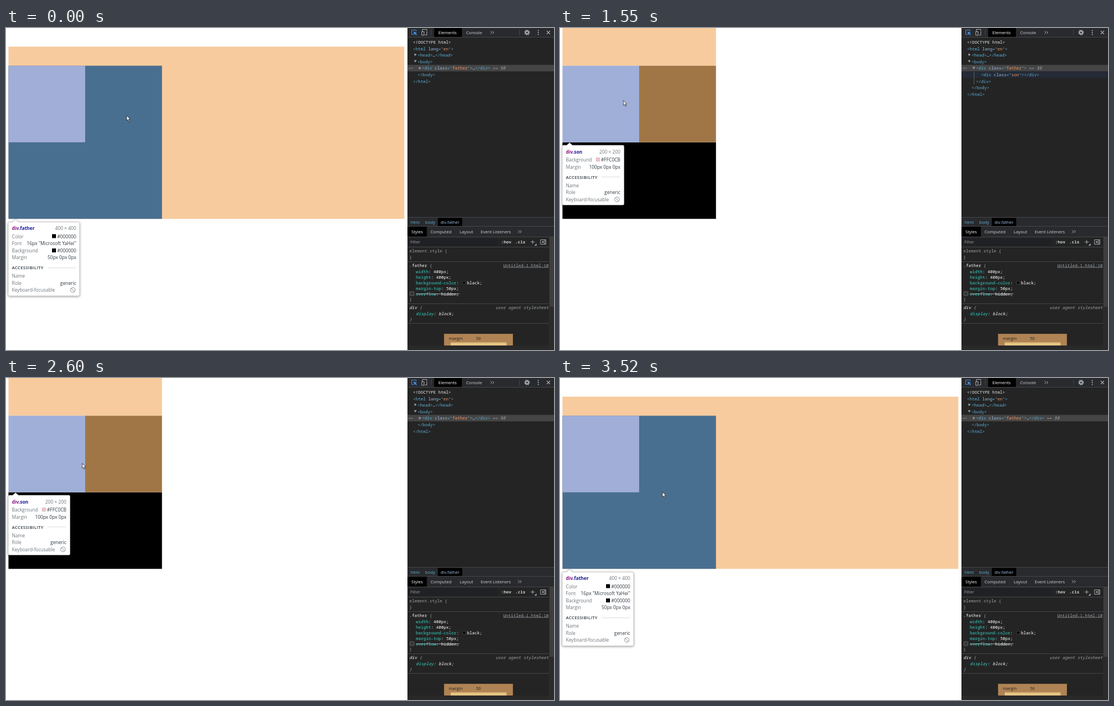
These frames come from a looping animation (976 by 574 pixels, 3.57 s). An HTML page:

```html
<!DOCTYPE html>
<html lang="en">
<head>
<meta charset="utf-8">
<title>Margin collapse in the inspector</title>
<style>
html, body { margin: 0; width: 100%; height: 100%; overflow: hidden; background: #fff; }
svg { display: block; width: 976px; height: 574px; }
text { font: 7.6px "Open Sans", "Noto Sans", sans-serif; white-space: pre; }
.mono text { font: 7.5px "Noto Sans Mono", "Liberation Mono", monospace; }
.mono .i { font-style: italic; }
.mono .b { font-weight: 700; }
.e { text-anchor: end; }
.panel { fill: #d0d3d7; }
.panel .on { fill: #fff; }
.tag { fill: #5db0d7; }
.attr { fill: #9bbbdc; }
.val { fill: #f29766; }
.dim { fill: #9aa0a6; }
.prop { fill: #35d4c7; }
.line { fill: none; stroke: #44464a; }
.icon { fill: none; stroke: #a5a9ae; }
.tip text { font-size: 8.3px; fill: #303942; }
.tip .k { fill: #6e757c; }
.tip .name { font-weight: 700; fill: #1a1a9c; }
.tip .cap { font-size: 7.6px; font-weight: 600; letter-spacing: .35px; }
.card { filter: drop-shadow(0 1px 2px #0006); fill: #fff; stroke: #bbb; stroke-width: .6; }

.father, .son, .open, .closed { animation: 3570ms step-end infinite; }
.father { animation-name: father; }
.son { animation-name: son; }
.open { animation-name: open; }
.closed { animation-name: closed; }
#cursor { animation: move 3570ms step-end infinite; }

@keyframes father {
  0%, 47.05%, 92.01% { visibility: visible; }
  25.76%, 71.84% { visibility: hidden; }
}
@keyframes son {
  0%, 47.05%, 92.01% { visibility: hidden; }
  25.76%, 71.84% { visibility: visible; }
}
@keyframes closed {
  0%, 47.05%, 92.01% { visibility: visible; }
  27.16%, 73.1% { visibility: hidden; }
}
@keyframes open {
  0%, 47.05%, 92.01% { visibility: hidden; }
  27.16%, 73.1% { visibility: visible; }
}
@keyframes move {
  0% { transform: translate(215px, 156px); }
  1.4% { transform: translate(212px, 158.5px); }
  20.16% { transform: translate(212px, 158.5px); animation-timing-function: steps(4); }
  25.76% { transform: translate(139px, 135.5px); animation-timing-function: steps(5); }
  32.77% { transform: translate(113px, 129px); }
  43.41% { transform: translate(113px, 129px); animation-timing-function: steps(3); }
  47.05% { transform: translate(153px, 155px); animation-timing-function: steps(6); }
  54.9% { transform: translate(200px, 162px); }
  62.74% { transform: translate(200px, 162px); animation-timing-function: steps(6); }
  70.58% { transform: translate(140px, 155px); animation-timing-function: steps(5); }
  77.03% { transform: translate(119px, 140px); }
  78.43% { transform: translate(117px, 139.5px); }
  79.27% { transform: translate(116px, 139px); }
  88.23% { transform: translate(116px, 139px); animation-timing-function: steps(2); }
  90.75% { transform: translate(142.5px, 164.5px); animation-timing-function: steps(6); }
  98.59%, 100% { transform: translate(182.5px, 203px); }
}
</style>
</head>
<body>
<svg viewBox="0 0 976 574">
  <defs>
    <g id="none" fill="none" stroke="#6e757c" stroke-width=".8">
      <circle r="4.2"/><path d="M-3-3 3 3"/>
    </g>
    <path id="chev" class="icon" d="M-3-2.5-.5 0-3 2.5M.5-2.5 3 0 .5 2.5"/>
  </defs>

  <!-- Page -->
  <rect width="715" height="574" fill="#fff"/>
  <g class="father">
    <path d="M4.400 33.200H709.400V340.200H4.400z" fill="#f7cb9d"/>
    <path d="M4.400 67.200H277.800V340.200H4.400z" fill="#496f90"/>
    <path d="M4.400 67.200H141V203.700H4.400z" fill="#a0aed8"/>
    <g class="tip">
      <path class="card" d="M6 346H12L17 341 22 346H129a2 2 0 0 1 2 2V475.5a2 2 0 0 1-2 2H6a2 2 0 0 1-2-2V348a2 2 0 0 1 2-2z"/>
      <text class="name" x="10.5" y="360"><tspan fill="#881280">div</tspan>.father</text>
      <text class="k e" x="125" y="360">400 × 400</text>
      <text class="k" x="10.5" y="374.5">Color</text>
      <path d="M82 367.5h7v7h-7z"/>
      <text class="e" x="125" y="374.5">#000000</text>
      <text class="k" x="10.5" y="387">Font</text>
      <text class="e" x="125" y="387">16px "Microsoft YaHei"</text>
      <text class="k" x="10.5" y="399.7">Background</text>
      <path d="M82 393h7v7h-7z"/>
      <text class="e" x="125" y="399.7">#000000</text>
      <text class="k" x="10.5" y="412.3">Margin</text>
      <text class="e" x="125" y="412.3">50px 0px 0px</text>
      <text class="cap" x="10.5" y="430">ACCESSIBILITY</text>
      <path d="M74 427.5H125" stroke="#ddd"/>
      <text class="k" x="10.5" y="445">Name</text>
      <text class="k" x="10.5" y="457.6">Role</text>
      <text class="e" x="125" y="457.6">generic</text>
      <text class="k" x="10.5" y="470.2">Keyboard-focusable</text>
      <use href="#none" x="119" y="467"/>
    </g>
  </g>
  <g class="son">
    <path d="M4.4 203.7H277.8V340.2H4.4z" fill="#000"/>
    <path d="M4.4 0H277.8V67.2H4.4z" fill="#f7cb9d"/>
    <path d="M141 67.2H277.8V203.7H141z" fill="#a17646"/>
    <path d="M4.4 67.2H141V203.7H4.4z" fill="#a0afd8"/>
    <g class="tip">
      <path class="card" d="M6 209H12L17 204.5 22 209H112a2 2 0 0 1 2 2V313.5a2 2 0 0 1-2 2H6a2 2 0 0 1-2-2V211a2 2 0 0 1 2-2z"/>
      <text class="name" x="10.5" y="223.5"><tspan fill="#881280">div</tspan>.son</text>
      <text class="k e" x="107.5" y="223.5">200 × 200</text>
      <text class="k" x="10.5" y="238.3">Background</text>
      <path d="M64.5 231.5h6v6h-6z" fill="#ffc0cb" stroke="#aaa" stroke-width=".6"/>
      <text class="e" x="107.5" y="238.3">#FFC0CB</text>
      <text class="k" x="10.5" y="250.8">Margin</text>
      <text class="e" x="107.5" y="250.8">100px 0px 0px</text>
      <text class="cap" x="10.5" y="268.5">ACCESSIBILITY</text>
      <path d="M74 265.5H107" stroke="#ddd"/>
      <text class="k" x="10.5" y="283.5">Name</text>
      <text class="k" x="10.5" y="296.1">Role</text>
      <text class="e" x="107.5" y="296.1">generic</text>
      <text class="k" x="10.5" y="308.7">Keyboard-focusable</text>
      <use href="#none" x="101.5" y="305.5"/>
    </g>
  </g>

  <!-- Inspector -->
  <g class="panel">
    <rect x="715" width="261" height="574" fill="#242424"/>
    <path d="M715 0H976V16.5H715zM715 338H976V372.5H715z" fill="#292a2d"/>
    <path d="M762.5 0H812V16.5H762.5zM769 338.5H812.5V353H769zM715 354H749.5V372.5H715z" fill="#000"/>
    <path class="line" d="M715 16.5H976M757.5 3V13M914.5 3V13M715 337.5H976M715 353.5H976M715 372.5H976M715 390.5H967M715 416.5H967M715 491.5H967M715 526.5H967"/>

    <path class="icon" d="M726 11.5H722.5V3.5H730.5V6" stroke="#4a8fe0" style="stroke: #4a8fe0"/>
    <path d="M725.5 6 732 8.5 729.5 9.5 732 12 731 13 728.5 10.5 727.5 13z" fill="#4a8fe0"/>
    <path class="icon" d="M741.5 6V2.5H749.5V5M740.5 6.5H744.5V13H740.5zM746 12.5H749.5V6"/>
    <text class="on" x="770" y="10.7">Elements</text>
    <text x="819.5" y="10.7">Console</text>
    <use href="#chev" x="866" y="8"/>
    <circle class="icon" cx="928" cy="8" r="2.7" stroke-width="2.2"/>
    <circle class="icon" cx="928" cy="8" r="4.3" stroke-width="1.5" stroke-dasharray="1.7 1.677"/>
    <g fill="#b4b8bd"><circle cx="948" cy="4.5" r="1"/><circle cx="948" cy="8" r="1"/><circle cx="948" cy="11.5" r="1"/></g>
    <path class="icon" d="M963 5 969 11M969 5 963 11" stroke-width="1.2"/>

    <!-- Element tree -->
    <rect x="715" y="65.7" width="261" height="11.6" fill="#454545"/>
    <g class="mono">
      <text x="725" y="28" fill="#e8eaed">&lt;!DOCTYPE html&gt;</text>
      <text class="tag" x="725" y="39.6">&lt;html <tspan class="attr">lang</tspan>="<tspan class="val">en</tspan>"&gt;</text>
      <path class="dim" d="M727.5 45 731.5 47.5 727.5 50zM726.5 57.5H731.5L729 61.5z"/>
      <text class="tag" x="733" y="51.2">&lt;head&gt;<tspan fill="#e8eaed">…</tspan>&lt;/head&gt;</text>
      <text class="tag" x="733" y="62.8">&lt;body&gt;</text>
      <g fill="#b4b8bd"><circle cx="718" cy="71.8" r=".7"/><circle cx="720.7" cy="71.8" r=".7"/><circle cx="723.4" cy="71.8" r=".7"/></g>
      <text class="tag" x="741" y="74.4">&lt;div <tspan class="attr">class</tspan>="<tspan class="val">father</tspan>"&gt;</text>
      <g class="closed">
        <path class="dim" d="M735.5 69 739.5 71.5 735.5 74z"/>
        <text class="tag" x="831" y="74.4"><tspan fill="#e8eaed">…</tspan>&lt;/div&gt;<tspan class="dim"> == </tspan><tspan class="dim i">$0</tspan></text>
        <text class="tag" x="733" y="86">&lt;/body&gt;</text>
        <text class="tag" x="725" y="97.6">&lt;/html&gt;</text>
      </g>
      <g class="open">
        <rect x="716" y="77.3" width="259" height="11.6" rx="2" fill="#242a36"/>
        <path class="dim" d="M734.5 69.5H739.5L737 73.5z"/>
        <path d="M737.5 78V100" stroke="#5b6167"/>
        <text class="dim" x="831" y="74.4"> == <tspan class="i">$0</tspan></text>
        <text class="tag" x="750" y="86">&lt;div <tspan class="attr">class</tspan>="<tspan class="val">son</tspan>"&gt;&lt;/div&gt;</text>
        <text class="tag" x="741" y="97.6">&lt;/div&gt;</text>
        <text class="tag" x="733" y="109.2">&lt;/body&gt;</text>
        <text class="tag" x="725" y="120.8">&lt;/html&gt;</text>
      </g>
    </g>

    <!-- Breadcrumbs and tabs -->
    <text class="tag" x="720.5" y="348.8">html</text>
    <text class="tag" x="746.5" y="348.8">body</text>
    <text x="774" y="348.8" fill="#a9c7ea">div.father</text>
    <text class="on" x="722" y="365.8">Styles</text>
    <text x="756" y="365.8">Computed</text>
    <text x="808" y="365.8">Layout</text>
    <text x="845.5" y="365.8">Event Listeners</text>
    <use href="#chev" x="915" y="363"/>

    <!-- Style rules -->
    <rect x="716" y="375" width="159" height="13" fill="#202124"/>
    <text class="dim" x="720" y="384.2">Filter</text>
    <path class="icon" d="M934.5 381.5H941.5M938 378V385M952 377.5H961.5V385.5H952zM959.5 377.5V385.5"/>
    <path d="M945 384V388H941zM957.5 379V384L954 381.5z" fill="#a5a9ae"/>
    <g class="mono">
      <text class="b" x="882" y="384">:hov</text>
      <text class="b" x="907" y="384">.cls</text>
      <text class="dim" x="718.5" y="400">element.style {</text>
      <text class="dim" x="718.5" y="411">}</text>
      <text class="on" x="718.5" y="425.5">.father <tspan class="dim">{</tspan></text>
      <text class="dim e" x="966.5" y="425.5" text-decoration="underline">Untitled-1.html:10</text>
      <text class="prop" x="730" y="437">width<tspan class="on">: 400px;</tspan></text>
      <text class="prop" x="730" y="447">height<tspan class="on">: 400px;</tspan></text>
      <text class="prop" x="730" y="456.8">background-color<tspan class="on">:</tspan></text>
      <path d="M813.5 451.5h5v5h-5z" fill="#000" stroke="#555" stroke-width=".6"/>
      <text class="on" x="821" y="456.8">black;</text>
      <text class="prop" x="730" y="466.7">margin-top<tspan class="on">: 50px;</tspan></text>
      <rect x="719.5" y="470" width="7" height="7" rx="1" fill="#333" stroke="#666"/>
      <text class="prop" x="730" y="476.5">overflow<tspan class="on">: hidden;</tspan></text>
      <path d="M730 474H807.5" stroke="#c9d5d5" stroke-width=".8"/>
      <text class="dim" x="718.5" y="486">}</text>
      <text class="on i" x="718.5" y="501">div <tspan class="dim">{</tspan></text>
      <text class="dim e i" x="966.5" y="501">user agent stylesheet</text>
      <text class="prop i" x="730" y="511.7">display<tspan class="on">: block;</tspan></text>
      <text class="dim i" x="718.5" y="521.5">}</text>
    </g>

    <!-- Box model -->
    <path d="M780 545H903V566H780z" fill="#b08354"/>
    <path d="M780.5 566V545.5H902.5V566" fill="none" stroke="#6d5439" stroke-dasharray="2 1.5" stroke-width=".7"/>
    <path d="M792 560.5H891.5V566H792z" fill="#e4c381"/>
    <text x="788.5" y="556.3" fill="#222">margin</text>
    <text x="837" y="556.3" fill="#222">50</text>
    <path d="M715 566H967V574H715z" fill="#292929"/>
    <path d="M967 373H976V574H967z" fill="#2b2b2b"/>
    <path d="M968 373H975.5V497H968z" fill="#3e3e3e"/>
  </g>

  <path id="cursor" d="M0 0V9L2 7.2 3.6 10.7 5 10 3.5 6.7H6z" fill="#fff" stroke="#111" stroke-width=".7"/>
</svg>
</body>
</html>
```
